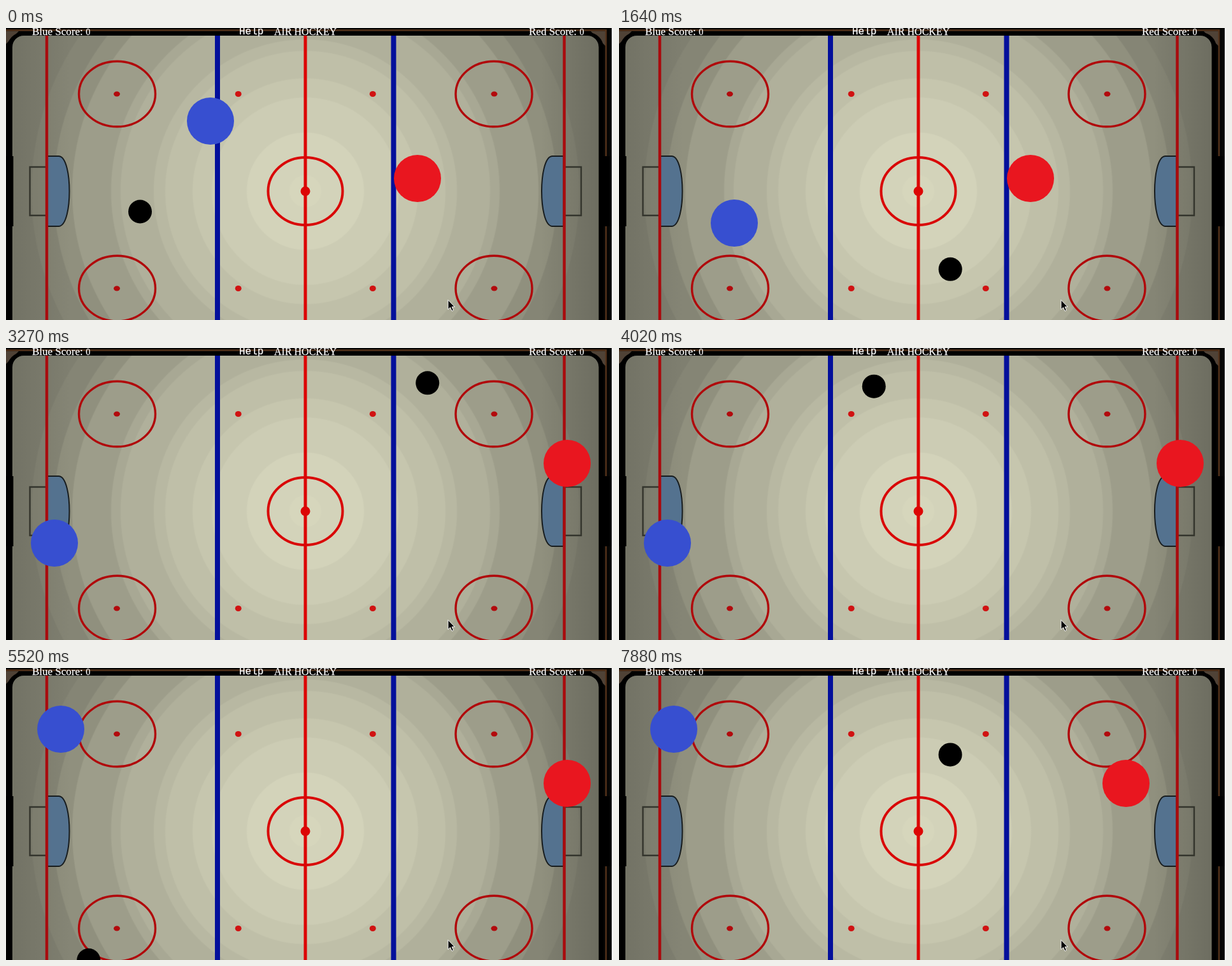
An HTML page for the animation above (8 s loop, 953 by 458 pixels).

```html
<!DOCTYPE html>
<html lang="en">
<head>
<meta charset="utf-8">
<title>Air hockey</title>
<style>
  html, body { margin: 0; width: 100%; height: 100%; overflow: hidden; background: #000; }
  svg { display: block; width: 953px; height: 458px; }
  text { fill: #fff; stroke: #fff; stroke-width: .25px; }
  .serif { font: 16px "Liberation Serif", serif; }
  .score { font-size: 17px; }
  .zero { font: 12px "DejaVu Serif", serif; }
  .mono { font: 16px "Liberation Mono", monospace; }
  #rink { filter: blur(.5px); }
</style>
</head>
<body>
<svg viewBox="0 0 953 458">
  <defs>
    <radialGradient id="ice" gradientUnits="userSpaceOnUse" cx="470" cy="256" r="520"></radialGradient>
    <linearGradient id="sides">
      <stop offset="0" stop-opacity=".1"/>
      <stop offset=".1" stop-opacity="0"/>
      <stop offset=".9" stop-opacity="0"/>
      <stop offset="1" stop-opacity=".14"/>
    </linearGradient>
    <g id="end">
      <path d="M65 201H83C95 202 99.5 232 99.5 256S95 310 83 311H65Z" fill="#54728f" stroke="#171c1e" stroke-width="2"/>
      <path d="M63 218H37.5V294H63" fill="none" stroke="#33342c" stroke-width="2.4"/>
      <path d="M64 12V470" stroke="#a90b0e" stroke-width="4.5"/>
      <g id="spot">
        <ellipse cx="174.5" cy="103.5" rx="60" ry="51.3" fill="none" stroke="#b0080b" stroke-width="3.4"/>
        <ellipse cx="174" cy="103.5" rx="5" ry="4" fill="#b20a0d"/>
        <ellipse cx="364.7" cy="103.5" rx="5" ry="4.5" fill="#d01212"/>
      </g>
      <use href="#spot" y="305"/>
      <path d="M332 12V470" stroke="#030f9b" stroke-width="8"/>
    </g>
  </defs>

  <rect width="953" height="458" fill="#050504"/>
  <path d="M0 5H20L0 25ZM918 5H941V28Z" fill="#4f4236"/>
  <path d="M0 3.5H942V458" fill="none" stroke="#53321a" stroke-width="2.5"/>
  <rect x="2" y="7" width="936" height="500" rx="24"/>
  <g id="rink">
    <rect x="10" y="12" width="920.5" height="490" rx="18" fill="url(#ice)"/>
    <rect x="10" y="12" width="920.5" height="490" rx="18" fill="url(#sides)"/>
    <use href="#end"/>
    <use href="#end" transform="translate(940.5) scale(-1 1)"/>
    <path d="M470 12V470" stroke="#dc0505" stroke-width="5"/>
    <ellipse cx="470" cy="256" rx="58.5" ry="53" fill="none" stroke="#d90707" stroke-width="4"/>
    <circle cx="470" cy="256" r="7.5" fill="#dc0505"/>
  </g>
  <path d="M0 201H11.5V311H0ZM931 201H951V311H931Z"/>
  <rect x="951" width="2" height="458" fill="#fff"/>

  <text class="serif score" x="41" y="11">Blue Score: <tspan class="zero">0</tspan></text>
  <text class="mono" x="366" y="9.5">Help</text>
  <text class="serif" x="421" y="11">AIR HOCKEY</text>
  <text class="serif score" x="821" y="11">Red Score: <tspan class="zero">0</tspan></text>

  <circle id="blue" r="37" fill="#374fd0"/>
  <circle id="red" r="37" fill="#e9161f"/>
  <circle id="puck" r="18.5"/>
  <path d="M694 426.5v15l3.5-3.2 2.5 5.5 2.500-1.100-2.400-5.400h4.400Z" stroke="#fff"/>
</svg>
<script>
  const byId = id => document.getElementById(id);

  // Ice: flat rings that darken away from the centre spot
  const rings = [25, 92, 147, 177, 220, 238, 290, 305, 366, 395, 430, 520];
  byId("ice").innerHTML = rings.map((outer, i) => {
    const inner = rings[i - 1] || 0;
    const mid = Math.min((inner + outer) / 2, 430);
    const light = 214 - 38 * (mid / 265) ** 1.7;
    const color = `rgb(${light}, ${light}, ${light * .88})`;
    return [inner + 1, outer - 1]
      .map(r => `<stop offset="${r / 520}" stop-color="${color}"/>`).join("");
  }).join("");

  // Paddles: [tick, dx, dy] key presses, across first and then up or down
  const SPEED = 80;
  const blueMoves = [[0, -185, 160], [6, 45, 0], [20.3, -105, 0], [28.5, 35, -165], [34.5, -25, -45]];
  const redMoves = [[11.25, 85, 0], [14, 0, -55], [17.1, 150, 0], [41, 0, 70], [42, -25, 0], [45, -60, -70]];

  const limit = (v, max) => Math.sign(v) * Math.min(Math.abs(v), Math.max(max, 0));

  function paddle(x, y, moves, tick) {
    for (const [start, dx, dy] of moves) {
      const reach = (tick - start) * SPEED;
      x += limit(dx, reach);
      y += limit(dy, reach - Math.abs(dx));
    }
    return [x, y];
  }

  // Puck: [tick, x, y, vx, vy] at each hit; in between it rebounds off the walls
  const hits = [
    [0, 210.5, 288, 0, 0],
    [6.25, 210.5, 288, 65.2, 65.2],
    [18.4, 850, 116, -52.3, -17],
    [31, 191, 128, -38, 70],
    [35, 39.5, 408.5, -56.6, 54.6],
    [47.6, 732, 150, 38, -75],
    [50, 732.5, 46.5, -70.8, 29.8]
  ];

  function rebound(v, min, max) {
    const span = max - min;
    const turn = (((v - min) % (2 * span)) + 2 * span) % (2 * span);
    return min + span - Math.abs(span - turn);
  }

  function puck(tick) {
    const [start, x, y, vx, vy] = hits.filter(hit => hit[0] <= tick).pop();
    const t = tick - start;
    return [rebound(x + vx * t, 28, 910), rebound(y + vy * t, 15, 488)];
  }

  function put(id, [x, y]) {
    byId(id).setAttribute("cx", x);
    byId(id).setAttribute("cy", y);
  }

  const LOOP = 8000, FIRST = 140, STEP = 148.85;
  const origin = performance.now();

  function draw() {
    const time = (performance.now() - origin) % LOOP;
    const tick = Math.floor((time - FIRST) / STEP) + 1;
    put("blue", paddle(321, 146, blueMoves, tick));
    put("red", paddle(646, 236, redMoves, tick));
    put("puck", puck(tick));
    requestAnimationFrame(draw);
  }
  draw();
</script>
</body>
</html>
```
